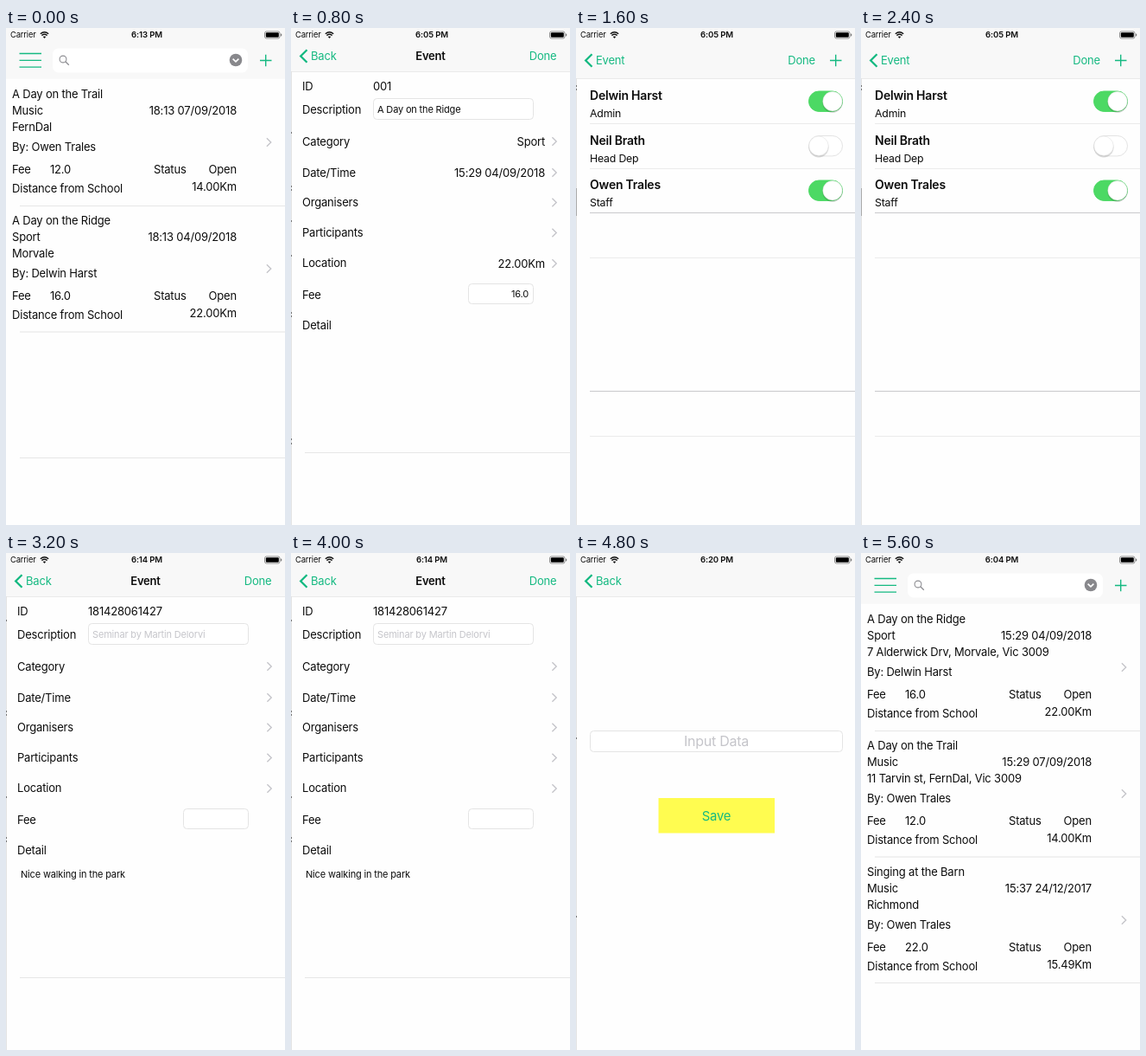
Write an HTML page that moves like this. It is 323 px wide and 574 px high and loops after 6.4 s.

```html
<!DOCTYPE html>
<html lang="en">
<head>
<meta charset="utf-8">
<title>Event app</title>
<style>
  html, body { margin: 0; width: 100%; height: 100%; overflow: hidden; background: #fefefe; }
  svg { display: block; width: 100vw; height: 100vh; }
  text { font-family: Inter, "Open Sans", sans-serif; letter-spacing: -.015em; white-space: pre; }
</style>
</head>
<body>
<svg id="stage" viewBox="0 0 323 574"></svg>
<script>
const GREEN = '#14b981', INK = '#0c0c0c', GREY = '#c5c5ca';
const LOOP = 6400;

// Vertical position is the middle of the capitals.
function text(x, mid, str, { size = 13, fill = INK, anchor = 'start', weight = 400 } = {}) {
  const y = (mid + size * .364).toFixed(2);
  return `<text x="${x}" y="${y}" font-size="${size}" fill="${fill}" text-anchor="${anchor}" font-weight="${weight}">${str}</text>`;
}
const right = (x, y, str, opt) => text(x, y, str, { ...opt, anchor: 'end' });
const center = (x, y, str, opt) => text(x, y, str, { ...opt, anchor: 'middle' });

const rect = (x, y, w, h, fill, extra = '') =>
  `<rect x="${x}" y="${y}" width="${w}" height="${h}" fill="${fill}" ${extra}/>`;
const stroke = (d, color, width = 1, extra = '') =>
  `<path d="${d}" fill="none" stroke="${color}" stroke-width="${width}" ${extra}/>`;

const divider = (y, color = '#e6e6e6') => rect(16, y, 307, 1, color);
const arrow = (x, y) => stroke(`M${x - 2.6} ${y - 4.8}l4.8 4.8l-4.8 4.8`, GREY, 1.4);
const plus = () => stroke('M294 37.5h13.5M300.7 30.7v13.5', GREEN, 1.4);
const field = (x, y, w, h) => rect(x + .5, y + .5, w - 1, h - 1, '#fff', 'rx="4" stroke="#e4e4e4"');

function statusBar(time) {
  const wifi = stroke('M39.8 6.7q4.7-4 9.4 0M41.4 8.6q3.1-2.6 6.2 0', '#111', 1.4) +
    '<path d="M42.7 10.1q1.8-1.4 3.6 0l-1.8 2z" fill="#111"/>';
  const battery = rect(299.5, 4, 17.5, 8, 'none', 'rx="2" stroke="#777" stroke-width=".8"') +
    rect(300.8, 5.2, 15, 5.6, '#000', 'rx="1"') + rect(318, 6.6, 1.2, 2.8, '#777', 'rx=".6"');
  return text(5, 8, 'Carrier', { size: 9.4 }) + wifi +
    center(163, 8, time, { size: 9.6, weight: 600 }) + battery;
}

function navBar(time, bottom, label) {
  const y = bottom - 17.5 - (bottom > 55 ? 3 : 0);
  const back = label ? stroke(`M18.5 ${y - 7.3}l-7.3 7.3l7.3 7.3`, GREEN, 2.3) +
    text(23, y, label, { fill: GREEN }) : '';
  return rect(0, 0, 323, bottom, '#f8f8f8') + rect(0, bottom, 323, .7, '#e3e3e3') + statusBar(time) + back;
}

// Thin left edge with slivers of the screen beneath it.
const edge = (top, marks) => rect(0, top, 1, 574 - top, '#e4e4e4') +
  marks.map(y => rect(0, y, 1, 2, '#777')).join('');

function eventRow(i, e) {
  const y = i * 146;
  return text(7, 76 + y, e.title) +
    text(7, 95 + y, e.kind) + right(267, 95 + y, e.when) +
    text(7, 114.5 + y, e.place) +
    text(7, 137.5 + y, 'By: ' + e.host) +
    text(7, 163 + y, 'Fee') + text(51, 163 + y, e.fee) +
    text(171, 163 + y, 'Status') + right(267, 163 + y, 'Open') +
    text(7, 185.5 + y, 'Distance from School') + right(267, 183.5 + y, e.far + 'Km') +
    arrow(304.5, 132 + y);
}

function listScreen(time, events) {
  const menu = stroke('M15.5 29.5h25.5M15.5 37.3h25.5M15.5 45.1h25.5', GREEN, 1.3);
  const search = rect(54, 23.5, 226, 28, '#fff', 'rx="7"') +
    '<circle cx="66" cy="36" r="3.9" fill="none" stroke="#8e8e93" stroke-width="1.1"/>' +
    stroke('M68.8 38.8l4 4', '#8e8e93', 1.3) +
    '<circle cx="266" cy="37" r="7.3" fill="#88888c"/>' +
    stroke('M262.6 35.6l3.4 3.3l3.4-3.3', '#fff', 1.6);
  return rect(0, 0, 323, 58.5, '#f8f8f8') + statusBar(time) + menu + search + plus() +
    events.map((e, i) => eventRow(i, e)).join('') +
    [205, 350.5, 496].map(y => divider(y)).join('');
}

function formScreen(time, d) {
  const labels = [['ID', 67.5], ['Description', 94.5], ['Category', 131], ['Date/Time', 167],
    ['Organisers', 201.5], ['Participants', 236.5], ['Location', 271.5], ['Fee', 308], ['Detail', 343.5]];
  return edge(50, d.marks) + navBar(time, 50, 'Back') +
    center(161.5, 32.5, 'Event', { weight: 600 }) + right(307.5, 32.5, 'Done', { fill: GREEN }) +
    labels.map(([str, y]) => text(13, y, str)).join('') +
    [131, 167, 201.5, 236.5, 272].map(y => arrow(305, y)).join('') +
    field(95, 81, 186, 25) + field(205, 295, 76, 24) +
    text(95, 67.5, d.id) +
    text(100, 93.5, d.name, { size: 11, fill: d.hint ? GREY : INK }) +
    right(294, 131.5, d.kind) + right(294, 167, d.when) + right(294, 272.5, d.far) +
    right(275, 307, d.fee, { size: 11 }) + text(17, 371, d.note, { size: 11 }) +
    divider(490);
}

function toggle(y, on) {
  const x = on ? 297 : 281;
  return rect(269.5, y - 11.7, 39, 23.4, on ? '#4cd964' : '#fff', `rx="11.7" stroke="${on ? '#4cd964' : '#e3e3e3'}"`) +
    `<circle cx="${x}" cy="${y + 1.6}" r="11.6" fill="#000" opacity=".14"/>` +
    `<circle cx="${x}" cy="${y}" r="11.2" fill="#fff" stroke="#ddd" stroke-width=".5"/>`;
}

function peopleScreen(time, people) {
  const rows = people.map(([name, role, on], i) => {
    const y = i * 51.5;
    return text(16, 78 + y, name, { size: 14, weight: 600 }) +
      text(16, 99 + y, role, { size: 12.3 }) + toggle(84.7 + y, on);
  });
  return edge(58, [66, 70]) + rect(0, 185, 1, 32, '#aaa') + navBar(time, 58, 'Event') +
    right(277, 37.5, 'Done', { fill: GREEN }) + plus() + rows.join('') +
    [110, 162, 265, 471].map(y => divider(y, '#ebebeb')).join('') +
    [213, 419].map(y => divider(y, '#c9c9cc')).join('');
}

function inputScreen(time) {
  return edge(50, [213, 419]) + navBar(time, 50, 'Back') +
    field(16, 205, 293, 25) + center(162.5, 217.5, 'Input Data', { size: 16, fill: GREY }) +
    rect(95.5, 283, 134.5, 40.5, '#fffc50') + center(162.5, 304, 'Save', { size: 14.8, fill: GREEN });
}

const trail = { title: 'A Day on the Trail', kind: 'Music', host: 'Owen Trales', fee: '12.0', far: '14.00' };
const meadow = { title: 'A Day on the Ridge', kind: 'Sport', host: 'Delwin Harst', fee: '16.0', far: '22.00' };
const barn = { title: 'Singing at the Barn', kind: 'Music', host: 'Owen Trales', fee: '22.0', far: '15.49',
  when: '15:37 24/12/2017', place: 'Richmond' };

const screens = [
  [0, listScreen('6:13 PM', [
    { ...trail, when: '18:13 07/09/2018', place: 'FernDal' },
    { ...meadow, when: '18:13 04/09/2018', place: 'Morvale' }])],
  [800, formScreen('6:05 PM', { id: '001', name: meadow.title, kind: 'Sport', when: '15:29 04/09/2018',
    far: '22.00Km', fee: '16.0', note: '', marks: [120, 182, 186, 222, 262, 328, 332, 474, 479] })],
  [1600, peopleScreen('6:05 PM', [
    ['Delwin Harst', 'Admin', true], ['Neil Brath', 'Head Dep', false], ['Owen Trales', 'Staff', true]])],
  [3200, formScreen('6:14 PM', { id: '181428061427', name: 'Seminar by Martin Delorvi', hint: true,
    kind: '', when: '', far: '', fee: '', note: 'Nice walking in the park', marks: [77, 182, 186, 281, 328, 332] })],
  [4800, inputScreen('6:20 PM')],
  [5600, listScreen('6:04 PM', [
    { ...meadow, when: '15:29 04/09/2018', place: '7 Alderwick Drv, Morvale, Vic 3009' },
    { ...trail, when: '15:29 07/09/2018', place: '11 Tarvin st, FernDal, Vic 3009' },
    barn])]
];

const stage = document.getElementById('stage');
stage.innerHTML = screens.map(([, body]) => `<g>${rect(0, 0, 323, 574, '#fefefe')}${body}</g>`).join('');
const groups = [...stage.children];

function draw(ms) {
  const t = ms % LOOP;
  const now = screens.filter(([start]) => start <= t).length - 1;
  groups.forEach((g, i) => g.setAttribute('display', i === now ? 'inline' : 'none'));
}

const begin = performance.now();
function tick() {
  draw(performance.now() - begin);
  requestAnimationFrame(tick);
}
tick();
</script>
</body>
</html>
```
